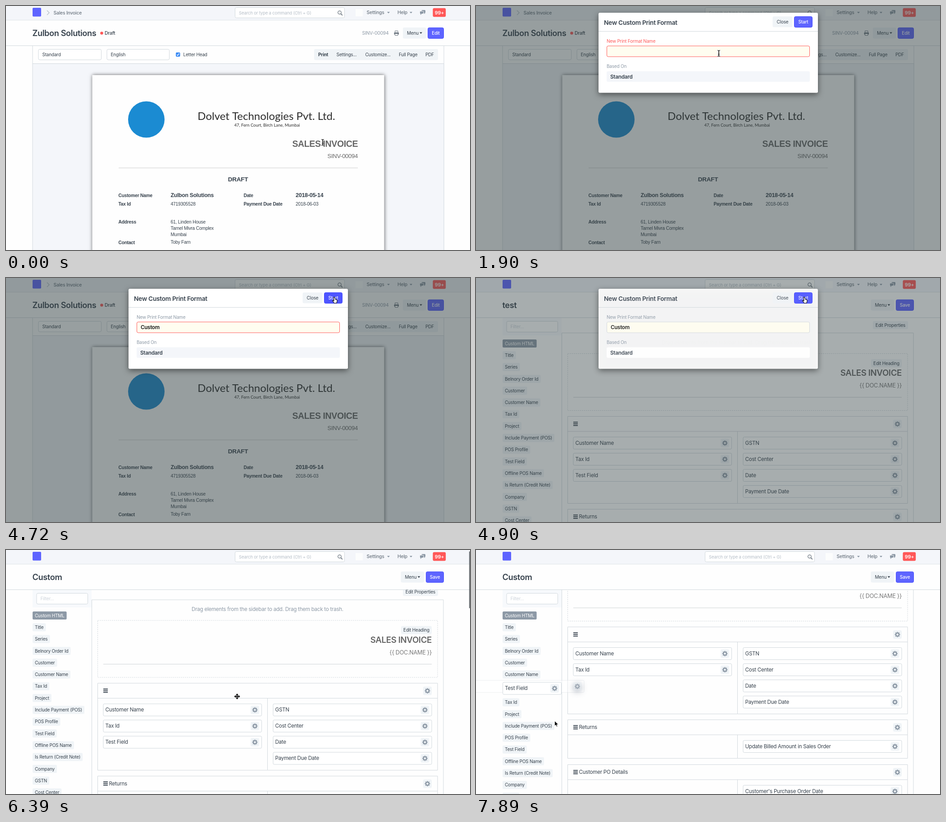
Write an HTML page with a canvas that moves like this. It is 1030 by 544 pixels and loops after 8 s.

```html
<!DOCTYPE html>
<html lang="en">
<head>
<meta charset="utf-8">
<title>Custom print format</title>
<style>
  html, body { margin: 0; width: 100%; height: 100%; overflow: hidden; background: #fff; }
  canvas { display: block; width: 1030px; height: 544px; }
</style>
</head>
<body>
<canvas id="stage" width="1030" height="544"></canvas>
<script>
const W = 1030, H = 544, LOOP = 8000;
const ctx = document.getElementById('stage').getContext('2d');
const UI = 'Inter, sans-serif', PRINT = '"Liberation Sans", Arial, sans-serif', LETTER = 'Lato, sans-serif';
const INK = '#36414c', NAV = '#6c7680', MUTED = '#8d99a6', LINE = '#d1d8dd';
const PALE = '#f0f4f7', PANEL = '#f4f6fa', BLUE = '#5e64ff', BLUE_EDGE = '#444bff', RED = '#ff5858';
const PAGE = '#fefefe', COMPANY = 'Zulbon Solutions';

// ---- drawing helpers ----
function text(str, x, cy, { size = 10, weight = 400, color = INK, font = UI, align = 'left' } = {}) {
  ctx.font = `${weight} ${size}px ${font}`;
  ctx.letterSpacing = font === LETTER ? '0px' : `${-0.02 * size}px`;
  ctx.textAlign = align;
  ctx.fillStyle = color;
  ctx.fillText(str, x, cy + size * 0.36);
  return ctx.measureText(str).width;
}

function box(x, y, w, h, fill, stroke, r = 3, width = 1) {
  ctx.beginPath();
  ctx.roundRect(x, y, w, h, r);
  if (fill) { ctx.fillStyle = fill; ctx.fill(); }
  if (stroke) { ctx.strokeStyle = stroke; ctx.lineWidth = width; ctx.stroke(); }
}

function rect(x, y, w, h, fill) {
  ctx.fillStyle = fill;
  ctx.fillRect(x, y, w, h);
}

function poly(points, fill, stroke, width = 1) {
  ctx.beginPath();
  points.forEach(([x, y]) => ctx.lineTo(x, y));
  if (fill) { ctx.closePath(); ctx.fillStyle = fill; ctx.fill(); }
  if (stroke) { ctx.strokeStyle = stroke; ctx.lineWidth = width; ctx.stroke(); }
}

function disc(x, y, r, fill, stroke, width = 1) {
  ctx.beginPath();
  ctx.arc(x, y, r, 0, Math.PI * 2);
  if (fill) { ctx.fillStyle = fill; ctx.fill(); }
  if (stroke) { ctx.strokeStyle = stroke; ctx.lineWidth = width; ctx.stroke(); }
}

function isolated(draw) {
  ctx.save();
  draw();
  ctx.restore();
}

function shadow(color, blur, dy = 0) {
  ctx.shadowColor = color;
  ctx.shadowBlur = blur;
  ctx.shadowOffsetY = dy;
}

const dropCaret = (x, y, color) => poly([[x - 3, y - 1.5], [x + 3, y - 1.5], [x, y + 2]], color);

function button(x, cy, w, label) {
  box(x, cy - 12, w, 24, PALE);
  text(label, x + w / 2, cy, { align: 'center' });
}

function primaryButton(x, cy, w, label, fill = BLUE) {
  box(x + 0.5, cy - 11.8, w - 1, 24, fill, BLUE_EDGE);
  text(label, x + w / 2, cy, { color: '#fff', weight: 500, align: 'center' });
}

function gear(x, y) {
  box(x - 9.5, y - 9.5, 19, 19, PALE);
  for (let i = 0; i < 8; i++) {
    const c = Math.cos(i * Math.PI / 4), s = Math.sin(i * Math.PI / 4);
    poly([[x + 3.6 * c, y + 3.6 * s], [x + 5.9 * c, y + 5.9 * s]], null, MUTED, 2.2);
  }
  disc(x, y, 3.4, null, MUTED, 2.3);
}

// ---- timing helpers ----
const stepIndex = (t, start, end, count) =>
  Math.min(count - 1, Math.floor((t - start) / (end - start) * (count - 1) + 1e-6));

function along(points, u) {
  const p = Math.max(0, Math.min(1, u)) * (points.length - 1);
  const i = Math.min(points.length - 2, Math.floor(p)), f = p - i;
  return points[i].map((v, k) => v + (points[i + 1][k] - v) * f);
}

// ---- page chrome ----
function navbar(crumb) {
  rect(0, 0, W, 31, PANEL);
  rect(0, 31, W, 1, '#dfe4e8');
  box(59, 4, 19, 19.5, BLUE, null, 2);
  if (crumb) {
    poly([[91, 10], [96, 15], [91, 20]], null, '#b4bdc5', 1.2);
    text(crumb, 105.5, 15.5, { size: 10.4, weight: 500, color: NAV });
  }
  box(508.5, 3.5, 243, 23, '#fff', LINE);
  text('Search or type a command (Ctrl + G)', 517, 15.5, { size: 9.6, color: '#b5bec7' });
  disc(740.5, 14.5, 3.7, null, NAV, 1.3);
  poly([[743.2, 17.2], [746.8, 20.8]], null, NAV, 1.7);
  rect(776, 7, 16, 16, '#fcfdfd');
  text('Settings', 800.5, 14.5, { size: 10.4, weight: 500, color: NAV });
  dropCaret(849, 14.5, MUTED);
  text('Help', 869, 14.5, { size: 10.4, weight: 500, color: NAV });
  dropCaret(899, 14.5, MUTED);
  box(922.5, 9, 8.5, 6.5, MUTED, null, 1.5);
  poly([[927, 15], [930, 15], [930, 18]], MUTED);
  box(918.5, 11.5, 8.5, 6, MUTED, PANEL, 1.5);
  poly([[920, 17], [923, 17], [920, 20]], MUTED);
  box(947.5, 4.7, 28.7, 19.6, RED);
  text('99+', 962, 14.7, { size: 10.8, weight: 600, color: '#fff', align: 'center' });
}

function titleBar(title, menuX, action, actionX) {
  rect(0, 32, W, 56, PAGE);
  rect(0, 88, W, 1, LINE);
  text(title, 58.5, 60.3, { size: 18.15, weight: 600 });
  box(menuX, 48, 51.5, 24.5, PALE);
  text('Menu', menuX + 9, 60.2);
  dropCaret(menuX + 40, 60, INK);
  primaryButton(actionX, 60.2, 972 - actionX, action);
}

// ---- invoice preview ----
function letterhead() {
  disc(311.5, 253, 40.5, '#1b8bd2');
  text('Dolvet Technologies Pvt. Ltd.', 578, 245.3, { size: 24, font: LETTER, color: '#2b2b2b', align: 'center' });
  text('47, Fern Court, Birch Lane, Mumbai', 579.5, 265.5, { size: 9.4, font: LETTER, color: '#2b2b2b', align: 'center' });
}

function invoicePage(hover) {
  rect(0, 0, W, H, PAGE);
  rect(59, 129, 914, H - 129, PANEL);
  rect(59, 128, 913, 1, LINE);
  rect(58.5, 88, 1, H, LINE);
  rect(971.5, 88, 1, H, LINE);

  box(72, 96.5, 139.5, 23.5, '#fff', LINE);
  text('Standard', 80.5, 108.2);
  box(224, 96.5, 138.5, 23.5, '#fff', LINE);
  text('English', 232.5, 108.2);
  box(377, 103.5, 9.5, 9.5, '#3b8bf5', null, 2);
  poly([[379.2, 108.4], [381, 110.4], [384.4, 105.8]], null, '#fff', 1.4);
  text('Letter Head', 393.5, 108.2);
  box(684, 96, 275, 24.5, PALE);
  if (hover) rect(789, 96, 75, 24.5, '#cfdce5');
  text('Print', 693, 108.2, { weight: 700 });
  text('Settings...', 733.5, 108.2);
  text('Customize...', 797.5, 108.2);
  text('Full Page', 872, 108.2);
  text('PDF', 931, 108.2);

  isolated(() => {
    shadow('rgba(0,0,0,.6)', 8);
    rect(191.5, 154, 648, H, PAGE);
  });
  letterhead();
  const print = (str, x, cy, size = 10.3, weight = 400, extra) =>
    text(str, x, cy, { size, weight, font: PRINT, ...extra });
  const label = (str, x, cy) => print(str, x, cy, 10.2, 700);
  print('SALES INVOICE', 781, 306.5, 19.5, 700, { color: '#666', align: 'right' });
  print('SINV-00094', 781, 334.5, 13, 400, { color: '#666', align: 'right' });
  rect(250, 360.5, 531, 1, '#cfcfcf');
  print('DRAFT', 515, 386, 13.5, 700, { align: 'center' });
  label('Customer Name', 249.5, 422.3);
  print(COMPANY, 365.5, 421.8, 12.2, 700);
  label('Tax Id', 249.5, 441.8);
  print('4719305528', 365.5, 441.2);
  label('Date', 527.5, 422.3);
  print('2018-05-14', 643, 421.8, 12.5, 700);
  label('Payment Due Date', 527.5, 441.8);
  print('2018-06-03', 643, 441.2);
  label('Address', 249.5, 481.8);
  ['61, Linden House', 'Tarnel Mivra Complex', 'Mumbai'].forEach((s, i) => print(s, 365.5, 481.2 + i * 13.8));
  label('Contact', 249.5, 527.2);
  print('Toby Farn', 365.5, 526.7);

  navbar('Sales Invoice');
  titleBar(COMPANY, 881, 'Edit', 936);
  disc(212.5, 60.5, 3.3, RED);
  text('Draft', 219, 60.2, { size: 10.4, weight: 500 });
  text('SINV-00094', 790.5, 60.2, { size: 10.3, color: MUTED });
  box(863.5, 55.5, 6.5, 4, null, NAV, 0);
  box(861.5, 59, 10.5, 4.5, NAV, null, 1);
  box(863.5, 61.5, 6.5, 4, '#fff', NAV, 0);
}

// ---- format builder ----
const CHIPS = ['Custom HTML', 'Title', 'Series', 'Belnory Order Id', 'Customer', 'Customer Name', 'Tax Id',
  'Project', 'Include Payment (POS)', 'POS Profile', 'Test Field', 'Offline POS Name',
  'Is Return (Credit Note)', 'Company', 'GSTN', 'Cost Center'];

function chip(label, x, cy, dark) {
  ctx.font = `400 10px ${UI}`;
  ctx.letterSpacing = '-0.2px';
  box(x, cy - 9, ctx.measureText(label).width + 10, 18, dark ? MUTED : PALE, null, 2.5);
  text(label, x + 5, cy, { color: dark ? '#fff' : INK });
}

function field(x, y, w, label) {
  box(x + 0.5, y + 0.5, w, 27, '#fff', LINE, 2.5);
  text(label, x + 5, y + 13.5, { size: 11.55 });
  gear(x + w - 14.5, y + 14);
}

function section(y, height, label, left, right) {
  box(203.5, y + 0.5, 754.5, height, PAGE, LINE, 0);
  rect(203, y + 33.5, 755, 1, LINE);
  rect(580, y + 34, 1, height - 34, LINE);
  for (let i = 0; i < 3; i++) rect(216, y + 12.5 + i * 3.7, 10, 1.9, INK);
  text(label, 228.5, y + 17, { size: 11.55 });
  gear(935.5, y + 17.5);
  left.forEach((s, i) => field(215.5, y + 46 + i * 36, 351.5, s));
  right.forEach((s, i) => field(592.5, y + 46 + i * 36, 352, s));
}

function canvasArea(scroll, firstColumn) {
  isolated(() => {
    ctx.translate(0, -scroll);
    box(190.5, 122.5, 780.5, 1000, PAGE, LINE, 0);
    box(881, 96, 78, 18, PALE);
    text('Edit Properties', 920, 105, { align: 'center' });
    text('Drag elements from the sidebar to add. Drag them back to trash.', 580.5, 143.5,
      { size: 11.55, color: MUTED, align: 'center' });
    ctx.setLineDash([2.5, 2]);
    box(203.5, 168.5, 754.5, 127, null, LINE, 0);
    ctx.setLineDash([]);
    box(877, 181, 68, 18, PALE);
    text('Edit Heading', 911, 190, { align: 'center' });
    text('SALES INVOICE', 945, 211.5, { size: 18.7, weight: 600, color: '#666', align: 'right' });
    text('{{ DOC.NAME }}', 945, 239.5, { size: 12.6, color: '#777', align: 'right' });
    rect(216, 265.5, 729, 1, '#cfd3d6');
    section(308, 194, '', firstColumn, ['GSTN', 'Cost Center', 'Date', 'Payment Due Date']);
    section(515, 86, 'Returns', [], ['Update Billed Amount in Sales Order']);
    section(615, 130, 'Customer PO Details', [], ["Customer's Purchase Order Date"]);
  });
}

function dragGhost(x, y) {
  isolated(() => {
    ctx.globalAlpha = 0.4;
    field(x, y, 351.5, 'Test Field');
    ctx.globalAlpha = 0.6;
    shadow('rgba(70,85,110,.45)', 14, 3);
    gear(x + 337, y + 14);
  });
}

function sidebar(inserted) {
  rect(59, 89, 131, 39, '#f7f9fc');
  box(68, 96.5, 113.5, 24, '#fff', LINE);
  text('Filter...', 76.5, 108.8, { color: '#ccd3da' });
  CHIPS.forEach((label, i) => chip(label, 59, 146 + i * 26.3 + (inserted && i > 5 ? 35.8 : 0), i === 0));
  if (inserted) field(59, 294.5, 130, 'Test Field');
}

function builderPage(title, scroll, drag) {
  const moved = drag > 0;
  rect(0, 0, W, H, PAGE);
  canvasArea(scroll, moved ? ['Customer Name', 'Tax Id'] : ['Customer Name', 'Tax Id', 'Test Field']);
  if (drag >= 0) dragGhost(216 + [-40, -230, -328][drag], 290);
  sidebar(moved);
  navbar();
  titleBar(title, 876.5, 'Save', 932);
  if (scroll > 0 && drag < 0) box(1028, 3 + (scroll - 11.5) * 0.25, 2, 127, 'rgba(70,75,80,.75)', null, 1);
}

// ---- dialog ----
function dialog(y, { typed, focused, caret, labelColor, borderColor, baseFill, hover }) {
  isolated(() => {
    shadow('rgba(0,0,0,.5)', 13, 4);
    box(272, y, 487, 178.5, '#fff');
  });
  rect(272, y + 41, 487, 1, LINE);
  text('New Custom Print Format', 284, y + 21.7, { size: 13.7, weight: 600 });
  button(658.5, y + 20.3, 44, 'Close');
  primaryButton(706, y + 20.3, 41, 'Start', hover ? '#4e55ff' : BLUE);
  text('New Print Format Name', 290, y + 63, { color: labelColor });
  box(290.5, y + 74, 450, 24, '#fffdf0', borderColor, 3, focused ? 1.5 : 1);
  const width = text(typed, 299, y + 86.3, { size: 11.5, weight: 600, color: '#111' });
  if (caret) rect(299 + width, y + 79, 1, 14, '#111');
  text('Based On', 290, y + 119, { color: MUTED });
  box(290, y + 130.5, 451, 23.5, baseFill);
  text('Standard', 298, y + 142.3, { size: 11.7, weight: 600 });
}

// ---- pointers ----
const pointers = {
  ibeam() {
    for (const [color, width] of [['rgba(255,255,255,.8)', 2.4], ['#111', 1.1]]) {
      poly([[-3, -6.5], [-1, -6.5], [0, -5.5], [0, 5.5], [-1, 6.5], [-3, 6.5]], null, color, width);
      poly([[3, -6.5], [1, -6.5], [0, -5.5], [0, 5.5], [1, 6.5], [3, 6.5]], null, color, width);
    }
    poly([[-1.8, 2], [1.8, 2]], null, '#111');
  },
  arrow() {
    const shape = [[0, 0], [0, 11.5], [2.7, 9], [4.6, 13.2], [6.6, 12.3], [4.8, 8.3], [8.2, 8.1], [0, 0]];
    poly(shape, '#000', '#fff');
  },
  hand() {
    const shape = [[-3, -6], [-1.4, -6.5], [0, -5], [0.6, -1.4], [4.5, -0.6], [5.2, 1], [4.5, 5],
      [3.6, 7], [-1.6, 7], [-5, 1.8], [-4, 0.8], [-2, 2], [-3, -6]];
    poly(shape, '#fff', '#111', 1.2);
  },
  move() {
    for (const [color, grow] of [['#fff', 1], ['#000', 0]]) {
      for (let i = 0; i < 4; i++) {
        ctx.rotate(Math.PI / 2);
        poly([[0, -6.5 - grow], [3 + grow, -3 + grow / 2], [-3 - grow, -3 + grow / 2]], color);
        rect(-0.9 - grow / 2, -4, 1.8 + grow, 4, color);
      }
    }
  }
};

function pointer([kind, [x, y]]) {
  isolated(() => {
    ctx.translate(x, y);
    pointers[kind]();
  });
}

const TO_CUSTOMIZE = [[696, 309], [640, 300], [545, 280], [470, 250], [510, 205], [640, 155], [760, 118], [800, 108], [808, 105]];
const TO_START = [[418, 106], [455, 103], [520, 93], [600, 78], [670, 62], [714, 52], [728, 50], [730, 49]];
const TO_SECTION = [[730, 49], [700, 85], [640, 160], [575, 240], [530, 300], [513, 326.5], [513, 326.5]];
const TO_FIELD = [[513, 326.5], [500, 322], [475, 308], [460, 304]];
const SCROLLS = [[11.5], [40], [75], [105], [126], [135], [137]];

function pointerAt(t) {
  if (t < 480) return ['ibeam', [703, 304]];
  if (t < 1900) {
    const p = along(TO_CUSTOMIZE, stepIndex(t, 480, 1490, 9) / 8);
    return [p[1] > 200 ? 'ibeam' : 'arrow', p];
  }
  if (t < 3840) return ['ibeam', [t < 2050 ? 539 : t < 2290 ? 450 : 413, 105.5]];
  if (t < 5200) {
    const p = along(TO_START, stepIndex(t, 3840, 4720, 8) / 7);
    return [p[0] > 706 ? 'hand' : p[1] > 97 ? 'ibeam' : 'arrow', p];
  }
  if (t < 6390) {
    const p = along(TO_SECTION, stepIndex(t, 5200, 6160, 7) / 6);
    return [p[1] > 308 ? 'move' : 'arrow', p];
  }
  if (t < 7540) return ['move', along(TO_FIELD, stepIndex(t, 6390, 7390, 7) / 6)];
  return ['arrow', [[420, 304], [230, 304], [174.5, 381]][stepIndex(t, 7540, 7890, 3)]];
}

function dialogAt(t, closing) {
  const letters = t < 2650 ? 0 : stepIndex(t, 2650, 3360, 6) + 1;
  const focused = t >= 2290 && t < 4720;
  const blinkOn = t < 3840 || stepIndex(t, 3840, 4720, 8) % 4 > 1;
  dialog(t < 2050 ? 15 : 24, {
    typed: 'Custom'.slice(0, letters),
    focused,
    caret: focused && blinkOn,
    labelColor: t < 4720 ? RED : MUTED,
    borderColor: closing ? LINE : focused ? '#f63c3c' : RED,
    baseFill: closing ? '#fff' : PANEL,
    hover: pointerAt(t)[0] === 'hand'
  });
}

function render(t) {
  if (t < 4900) {
    invoicePage(t >= 1490 && t < 1900);
  } else {
    const scroll = t < 6390 ? 0 : along(SCROLLS, stepIndex(t, 6390, 7390, 7) / 6)[0];
    builderPage(t < 5200 ? 'test' : 'Custom', scroll, t < 7540 ? -1 : stepIndex(t, 7540, 7890, 3));
  }
  if (t >= 1900 && t < 5200) {
    const closing = t >= 4900;
    rect(0, 0, W, H, `rgba(51,65,67,${closing ? 0.43 : 0.5})`);
    isolated(() => {
      ctx.globalAlpha = closing ? 0.93 : 1;
      dialogAt(t, closing);
    });
  }
  pointer(pointerAt(t));
}

let began;
function tick(now) {
  began ??= now;
  render((now - began) % LOOP);
  requestAnimationFrame(tick);
}
requestAnimationFrame(tick);
</script>
</body>
</html>
```
